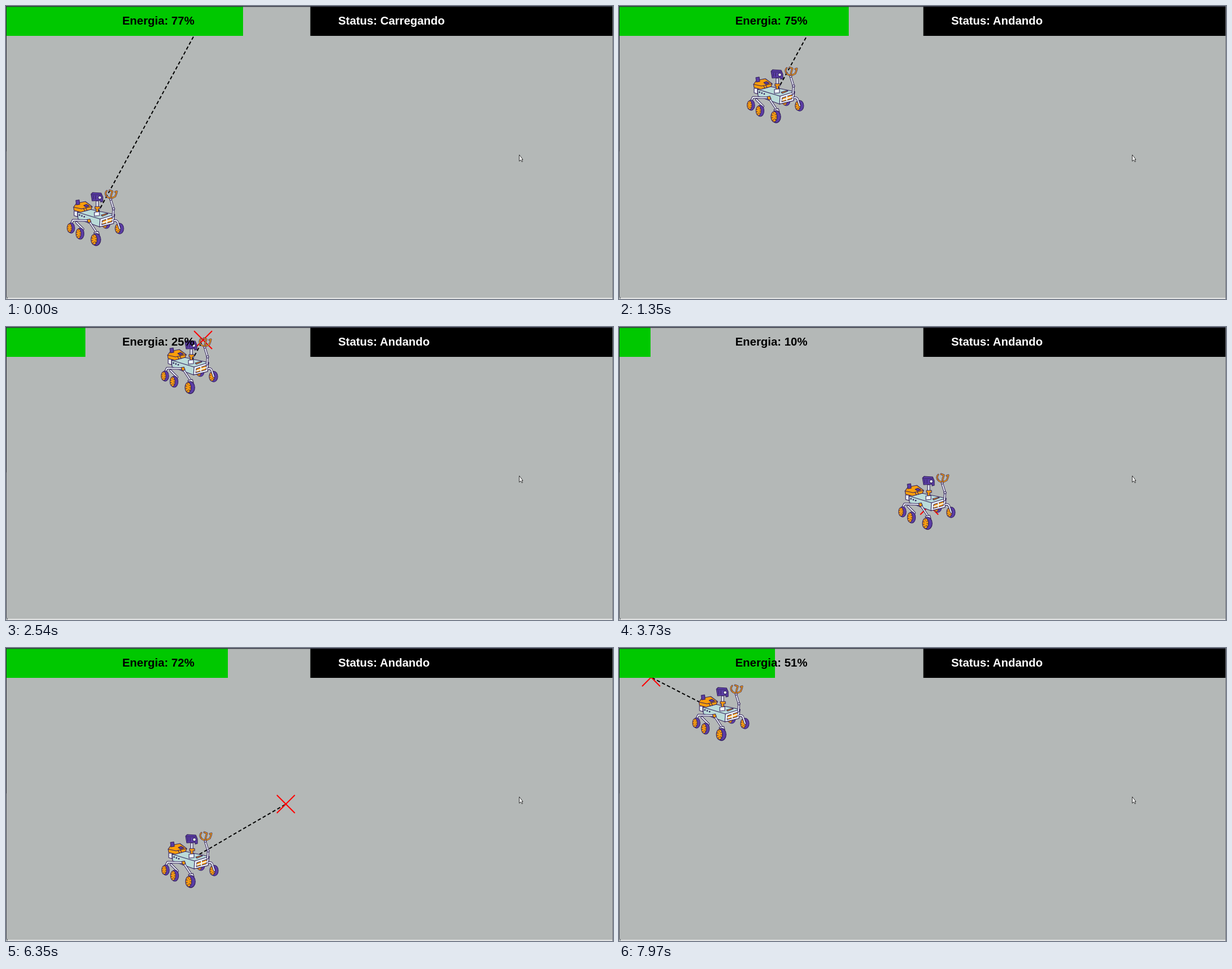
An HTML page for the animation above (8 s loop, 1078x520 px).

```html
<!DOCTYPE html>
<html lang="pt">
<head>
<meta charset="utf-8">
<title>Rover</title>
<style>
html, body { margin: 0; width: 100%; height: 100%; overflow: hidden; background: #b4b8b7; }
svg { display: block; width: 1078px; height: 520px; }
text { font: bold 20.4px "Liberation Sans", Arial, sans-serif; }
#rover { stroke: #34225c; stroke-width: 1.1; stroke-linejoin: round; stroke-linecap: round; }
.orange { fill: #fb9e0c; }
.purple { fill: #5b3da6; }
.blue { fill: #badbd9; }
.white { fill: #edf3f8; }
.line { fill: none; }
.edge { fill: none; stroke-width: 4; }
.core { fill: none; stroke: #edf3f8; stroke-width: 2; }
.claw-edge { fill: none; stroke-width: 3; }
.claw { fill: none; stroke: #fb9e0c; stroke-width: 1.5; }
.studs { fill: none; stroke-width: 2.8; stroke-dasharray: 0 4.5; }
.spokes { fill: none; stroke-width: 3; stroke-dasharray: .8 3; stroke-linecap: butt; }
</style>
</head>
<body>
<svg viewBox="0 0 1078 520">
  <defs>
    <path id="legs" d="M9 61 L12 55 L40 56 M18 59 L30 71 M40 56 L54 77 M85 56 Q91 55 92 61 L95 70"/>
    <path id="arm" d="M83 48 L84 35 L79 19"/>
    <path id="claws" d="M79 17 L73 14 Q67 8 72 3 M79 16 L80 10 L82 4 L77 2 M79 17 L87 13 L89 8 L90 4 L87 5"/>
    <g id="wheel">
      <ellipse class="purple" cx="1.500" rx="7.500" ry="10"/>
      <ellipse class="orange" cx="-2" rx="5" ry="8.500"/>
      <ellipse class="spokes" cx="-2" rx="3" ry="5.500"/>
    </g>
  </defs>
  <path id="route" stroke="#000" stroke-width="2" stroke-dasharray="6 4"/>
  <path id="goal" d="M-16 -16 L16 16 M16 -16 L-16 16" stroke="#f00" stroke-width="2"/>

  <g id="rover">
    <use href="#wheel" transform="translate(70 63) scale(.85 .7)"/>
    <use href="#wheel" transform="translate(93.500 70) scale(.95)"/>
    <!-- chassis -->
    <path class="white" d="M14 39 H20 V49 L14 47 Z"/>
    <path class="blue" d="M20 41 L43 36 L86 45 L84 61 L59 67 L21 53 Z"/>
    <path class="white" d="M60 53 L86 45 L84 61 L59 67 Z"/>
    <path class="line" d="M20 41 L60 53"/>
    <path class="orange" d="M64 56 L82 50 L81 58 L63 63 Z"/>
    <path class="core" d="M64 60 L81 54 M72 53 V60"/>
    <path class="orange" d="M62 46 L72 43 L74 44 L64 48 Z"/>
    <path class="studs" d="M23.500 46 L33 49.500"/>
    <!-- power unit -->
    <path class="orange" d="M13 32 L18 25 L34 22 L46 31 L44 36 L26 41 L14 38 Z"/>
    <path class="line" d="M13 32 L27 35 L46 31 M31 35 L33 39 M35 34 L37 38"/>
    <path class="purple" d="M17 20 L23 19 L24 27 L18 28 Z"/>
    <path class="purple" d="M31 29 L36 27 L41 30 L35 32 Z"/>
    <!-- mast and camera -->
    <path class="white" d="M53 21 H57 V32 H53 Z"/>
    <path class="orange" d="M51 31 H60 V35 H57 V41 H53 V35 H51 Z"/>
    <path class="white" d="M50 41 L59 40 V47 L50 48 Z"/>
    <path class="purple" d="M44 9 L47 6 L62 7 L65 14 V22 L61 23 V20 L46 21 Z"/>
    <path class="line" d="M45 10 H62 M48 12 V18 M52 12 V18"/>
    <circle class="white" cx="59.500" cy="15" r="2.800"/>
    <!-- arm -->
    <use href="#arm" class="edge"/><use href="#arm" class="core"/>
    <circle class="white" cx="84" cy="35" r="2"/>
    <use href="#claws" class="claw-edge"/><use href="#claws" class="claw"/>
    <circle class="white" cx="79" cy="18" r="1.800"/>
    <!-- suspension -->
    <use href="#legs" class="edge"/><use href="#legs" class="core"/>
    <path class="orange" d="M37 54 L42 53 L44 58 L39 60 Z"/>
    <path class="white" d="M49 77 L57 75 L59 81 L50 81 Z"/>
    <use href="#wheel" transform="translate(7.500 69) scale(.85 .92)"/>
    <use href="#wheel" transform="translate(23.500 79) scale(.9 1)"/>
    <use href="#wheel" transform="translate(51.500 89.500) scale(1.080 1.090)"/>
  </g>

  <rect id="bar" x="1" y="1" height="52" fill="#00c800"/>
  <rect x="540.500" y="1" width="538" height="52"/>
  <text id="energy" x="206.500" y="33"></text>
  <text id="status" x="590" y="33" fill="#fff"></text>

  <!-- window border and pointer -->
  <path d="M0 .8 H1078" stroke="#383a48" stroke-width="1.600"/>
  <path d="M.5 0 V258" stroke="#2b2d39"/>
  <path d="M.5 258 V515 Q.5 518 4 518.500" stroke="#4b4e58" fill="none"/>
  <path d="M1077.500 0 V520" stroke="#777a80"/>
  <path d="M3 518.800 H1077" stroke="#f4f4f4" stroke-width="1.600"/>
  <path d="M911.500 264 V275.500 L914 273 L916 276.500 L917.500 276 L916 272.500 H918 Z" fill="#fff" stroke="#222" stroke-width=".9"/>
</svg>
<script>
const LOOP = 8000;
const SPEED = 0.342;    // px per ms
const COST = 0.0392;    // % per px
const CHARGE = 0.0665;  // % per ms
const DRAIN = 0.051;    // % per ms while stuck
const PAUSE = 20;       // ms at a goal

// Each step runs from one state to the next at a steady rate.
const steps = [];
let now = { t: 0, x: 158, y: 376, e: 77.8 };
let target;

function add(ms, change, charging = false) {
  const next = { ...now, ...change, t: now.t + ms };
  steps.push({ from: now, to: next, target, charging });
  now = next;
}
const aim = (x, y) => { target = { x, y }; };
const pause = () => add(PAUSE, {});
const charge = () => add((100 - now.e) / CHARGE, { e: 100 }, true);
const drain = loss => add(loss / DRAIN, { e: now.e - loss });
function walk(share = 1) {
  const dx = (target.x - now.x) * share, dy = (target.y - now.y) * share;
  const d = Math.hypot(dx, dy);
  add(d / SPEED, { x: now.x + dx, y: now.y + dy, e: now.e - d * COST });
}

aim(350, 23);
charge();
walk(0.618);
drain(15);
drain(45.4);
walk();
pause();
aim(551, 317);
walk();
pause();
aim(292, 396);
charge();
walk();
pause();
aim(497, 277);
drain(15);
walk();
aim(57, 52);
walk();

const [route, goal, rover, bar, energy, status] =
  ["route", "goal", "rover", "bar", "energy", "status"].map(id => document.getElementById(id));

function draw(t) {
  const { from, to, target, charging } = steps.find(s => t < s.to.t);
  const u = (t - from.t) / (to.t - from.t);
  const [x, y, e] = ["x", "y", "e"].map(k => from[k] + (to[k] - from[k]) * u);
  rover.setAttribute("transform", `translate(${Math.round(x) - 51} ${Math.round(y) - 51})`);
  goal.setAttribute("transform", `translate(${target.x} ${target.y})`);
  route.setAttribute("d", `M${x} ${y} L${target.x} ${target.y}`);
  bar.setAttribute("width", Math.round(e * 5.4));
  energy.textContent = `Energia: ${Math.floor(e)}%`;
  status.textContent = "Status: " + (charging ? "Carregando" : "Andando");
}

const start = performance.now();
function tick() {
  draw((performance.now() - start) % LOOP);
  requestAnimationFrame(tick);
}
tick();
</script>
</body>
</html>
```
